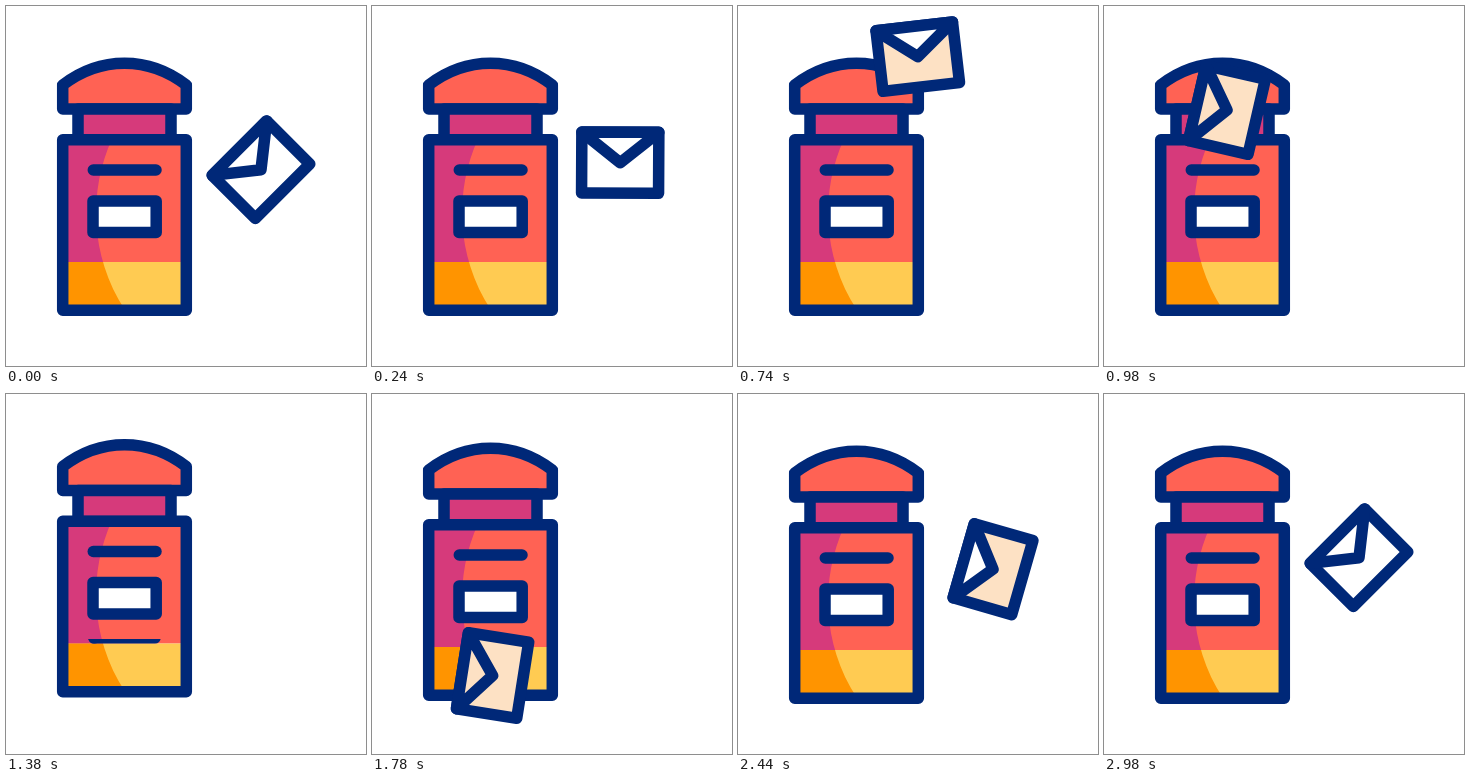
Animation of 360x360 px, one loop 3 s. Source, as an HTML page with a canvas:

```html
<!DOCTYPE html>
<html lang="en">
<head>
<meta charset="utf-8">
<title>Post box</title>
<style>
html, body { margin: 0; width: 100%; height: 100%; overflow: hidden; background: #fff; }
canvas { display: block; width: 360px; height: 360px; }
</style>
</head>
<body>
<canvas id="stage"></canvas>
<script>
const LOOP = 3000, SIZE = 360;
const NAVY = '#002878', CORAL = '#ff6254', PINK = '#d63a7b';
const ORANGE = '#ff9400', YELLOW = '#ffcb52', CREAM = [253, 225, 196];

const canvas = document.getElementById('stage');
const ctx = canvas.getContext('2d');
const ratio = window.devicePixelRatio || 1;
canvas.width = canvas.height = SIZE * ratio;

// Progress from 0 to 1 between two times, straight or eased
const line = (t, from, to) => Math.min(1, Math.max(0, (t - from) / (to - from)));
const ease = (t, from, to) => {
  const u = line(t, from, to);
  return u * u * (3 - 2 * u);
};

// The letter's pose is a sum of moves that cancel out over one loop
function letterPose(t) {
  const windUp = ease(t, 0, 480);
  const toss = line(t, 480, 1000);
  const drop = line(t, 1060, 1260) ** 2;
  const eject = line(t, 1340, 1700) ** 1.35;
  const settle = ease(t, 2440, 2680);
  return {
    x: 255 - 13.5 * windUp - 123 * toss + 136.5 * ease(t, 1740, 2300),
    y: 163.7 - 14 * windUp - 38 * toss - 80 * Math.sin(Math.PI * toss)
      + 99.5 * drop - 11 * line(t, 1280, 1340) + 97 * eject
      - 122 * ease(t, 1700, 2060) - 11.5 * settle,
    angle: -45 + 90 * windUp - 135 * ease(t, 480, 1100)
      + 16 * ease(t, 1700, 1850) + 29 * settle
  };
}

function boxLift(t) {
  return -13 * ease(t, 1100, 1260) + 10 * ease(t, 1260, 1460) + 3 * ease(t, 1780, 1960);
}

function tint(k) {
  return `rgb(${CREAM.map(c => Math.round(255 + (c - 255) * k)).join()})`;
}

function rect(color, x, y, w, h) {
  ctx.fillStyle = color;
  ctx.fillRect(x, y, w, h);
}

function panel(color, x, y, w, h) {
  rect(color, x, y, w, h);
  ctx.strokeRect(x, y, w, h);
}

function drawBox() {
  // roof
  ctx.beginPath();
  ctx.moveTo(56.7, 103);
  ctx.lineTo(56.7, 79);
  ctx.quadraticCurveTo(85, 57.2, 118.5, 57.2);
  ctx.quadraticCurveTo(152, 57.2, 180.3, 79);
  ctx.lineTo(180.3, 103);
  ctx.closePath();
  ctx.fillStyle = CORAL;
  ctx.fill();
  ctx.stroke();

  panel(PINK, 72, 103, 93, 31);

  // body with its curved shade
  rect(CORAL, 56.7, 134, 123.6, 122);
  rect(YELLOW, 56.7, 256, 123.6, 48);
  ctx.save();
  ctx.beginPath();
  ctx.moveTo(56, 133);
  ctx.lineTo(106, 133);
  ctx.bezierCurveTo(83, 183, 83, 249, 119, 304);
  ctx.lineTo(56, 304);
  ctx.clip();
  rect(PINK, 56.7, 134, 80, 122);
  rect(ORANGE, 56.7, 256, 80, 48);
  ctx.restore();
  ctx.strokeRect(56.7, 133.8, 123.6, 170.4);

  // slot and label
  ctx.beginPath();
  ctx.moveTo(87.3, 164);
  ctx.lineTo(150, 164);
  ctx.stroke();
  panel('#fff', 87, 195, 63.2, 31.5);
}

function drawLetter(t) {
  const w = 38.5, h = 30.5, pose = letterPose(t);
  ctx.translate(pose.x, pose.y);
  ctx.rotate(pose.angle * Math.PI / 180);
  panel(tint(ease(t, 540, 700) - ease(t, 2460, 2680)), -w, -h, 2 * w, 2 * h);
  ctx.beginPath();
  ctx.moveTo(-w, -h);
  ctx.lineTo(0, 0);
  ctx.lineTo(w, -h);
  ctx.closePath();
  ctx.fillStyle = tint(ease(t, 880, 980) - ease(t, 1840, 2040));
  ctx.fill();
  ctx.stroke();
}

function clipBand(top, bottom) {
  ctx.beginPath();
  ctx.rect(0, top, SIZE, bottom - top);
  ctx.clip();
}

function draw(t) {
  const dy = boxLift(t);
  ctx.setTransform(ratio, 0, 0, ratio, 0, 0);
  rect('#fff', 0, 0, SIZE, SIZE);
  ctx.strokeStyle = NAVY;
  ctx.lineWidth = 11.5;
  ctx.lineJoin = ctx.lineCap = 'round';

  ctx.save();
  ctx.translate(0, dy);
  drawBox();
  ctx.restore();

  // in through the upper slot, out below the label
  ctx.save();
  if (t >= 1060 && t < 1260) clipBand(0, 164 + dy);
  else if (t >= 1260 && t < 1700) clipBand(251.5 + dy, SIZE);
  if (t < 1260 || t >= 1340) drawLetter(t);
  ctx.restore();
}

const start = performance.now();
function tick(now) {
  draw(Math.max(0, now - start) % LOOP);
  requestAnimationFrame(tick);
}
draw(0);
requestAnimationFrame(tick);
</script>
</body>
</html>
```
